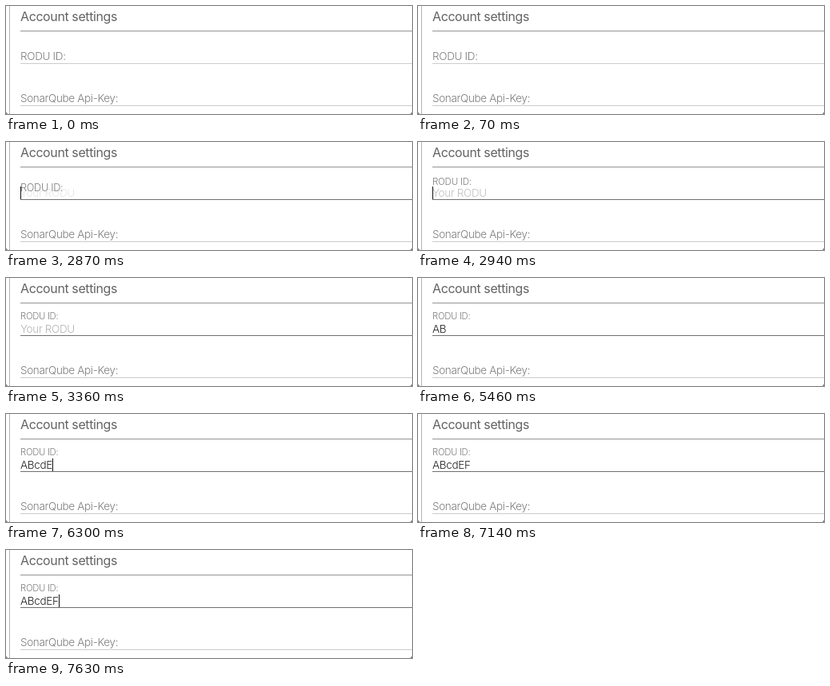
Animation of 508x136 px, one loop 8 s. Source, as an HTML page with a canvas:

```html
<!DOCTYPE html>
<html lang="en">
<head>
<meta charset="utf-8">
<title>Account settings</title>
<style>
  html, body { margin: 0; width: 100%; height: 100%; overflow: hidden; background: #fff; }
  canvas { display: block; width: 508px; height: 136px; }
</style>
</head>
<body>
<canvas id="stage"></canvas>
<script>
const W = 508, H = 136, LOOP = 8000, STEP = 70;
const LEFT = 18, FOCUS = 2870;
const canvas = document.getElementById('stage');
const ctx = canvas.getContext('2d');
const ratio = window.devicePixelRatio || 1;
canvas.width = Math.round(W * ratio);
canvas.height = Math.round(H * ratio);

const TYPED = 'ABcdEF';
const KEY_TIMES = [4200, 4900, 5530, 5810, 6300, 6580];
// The caret starts visible on focus and flips or resets at these times.
const CARET = [[FOCUS, 1], [3360, 0], [3920, 1], [4760, 0], [4900, 1],
               [5460, 0], [5530, 1], [7140, 0], [7630, 1]];

const lerp = (a, b, p) => a + (b - a) * p;

function setFont(size, weight) {
  ctx.font = `${weight} ${size}px Inter, "Open Sans", sans-serif`;
  ctx.letterSpacing = `${-0.025 * size}px`;
}

function text(str, y, size, color, weight = 300) {
  setFont(size, weight);
  ctx.fillStyle = color;
  ctx.fillText(str, LEFT, y);
}

function rect(x, y, w, h, color) {
  ctx.fillStyle = color;
  ctx.fillRect(x, y, w, h);
}

function focusProgress(t) {
  if (t < FOCUS) return 0;
  const elapsed = Math.floor((t - FOCUS) / STEP) * STEP + 26;
  const x = Math.min(1, elapsed / 250);
  return elapsed > 230 ? 1 : 1 - Math.pow(1 - x, 3.8);
}

function caretOn(t) {
  let on = 0;
  for (const [time, state] of CARET) if (t >= time) on = state;
  return on;
}

function drawFrameLines() {
  rect(4, 0, 1, H, '#b4b4b4');
  for (const x of [0, W - 2]) {
    rect(x, H - 1, 2, 1, '#a0a0a0');
    rect(x ? W - 1 : 0, H - 2, 1, 2, '#808080');
  }
}

function drawField(t) {
  const p = focusProgress(t);
  const value = TYPED.slice(0, KEY_TIMES.filter(k => t >= k).length);
  rect(LEFT, 72, W - LEFT, 1, p > 0 ? '#707070' : '#cccccc');
  text('RODU ID:', lerp(67.5, 52, p), lerp(13.5, 11.3, p), '#7c7c7c');

  if (value) {
    text(value, 69, 13.5, '#222222');
  } else if (p > 0) {
    ctx.globalAlpha = p;
    text('Your RODU', 69, 13.5, '#b4b4b4');
    ctx.globalAlpha = 1;
  }

  if (caretOn(t)) {
    setFont(13.5, 300);
    const x = Math.round(LEFT + 0.4 + ctx.measureText(value).width);
    rect(x, 56, 1, 16, '#111111');
  }
}

function draw(t) {
  ctx.setTransform(ratio, 0, 0, ratio, 0, 0);
  rect(0, 0, W, H, '#ffffff');
  drawFrameLines();
  text('Account settings', 19, 16, '#626262', 400);
  rect(LEFT, 31, W - LEFT, 1, '#949494');
  drawField(t);
  text('SonarQube Api-Key:', 121, 13.5, '#7c7c7c');
  rect(LEFT, 125, W - LEFT, 1, '#cccccc');
}

const start = performance.now();
function tick() {
  draw((performance.now() - start) % LOOP);
  requestAnimationFrame(tick);
}
tick();
</script>
</body>
</html>
```
